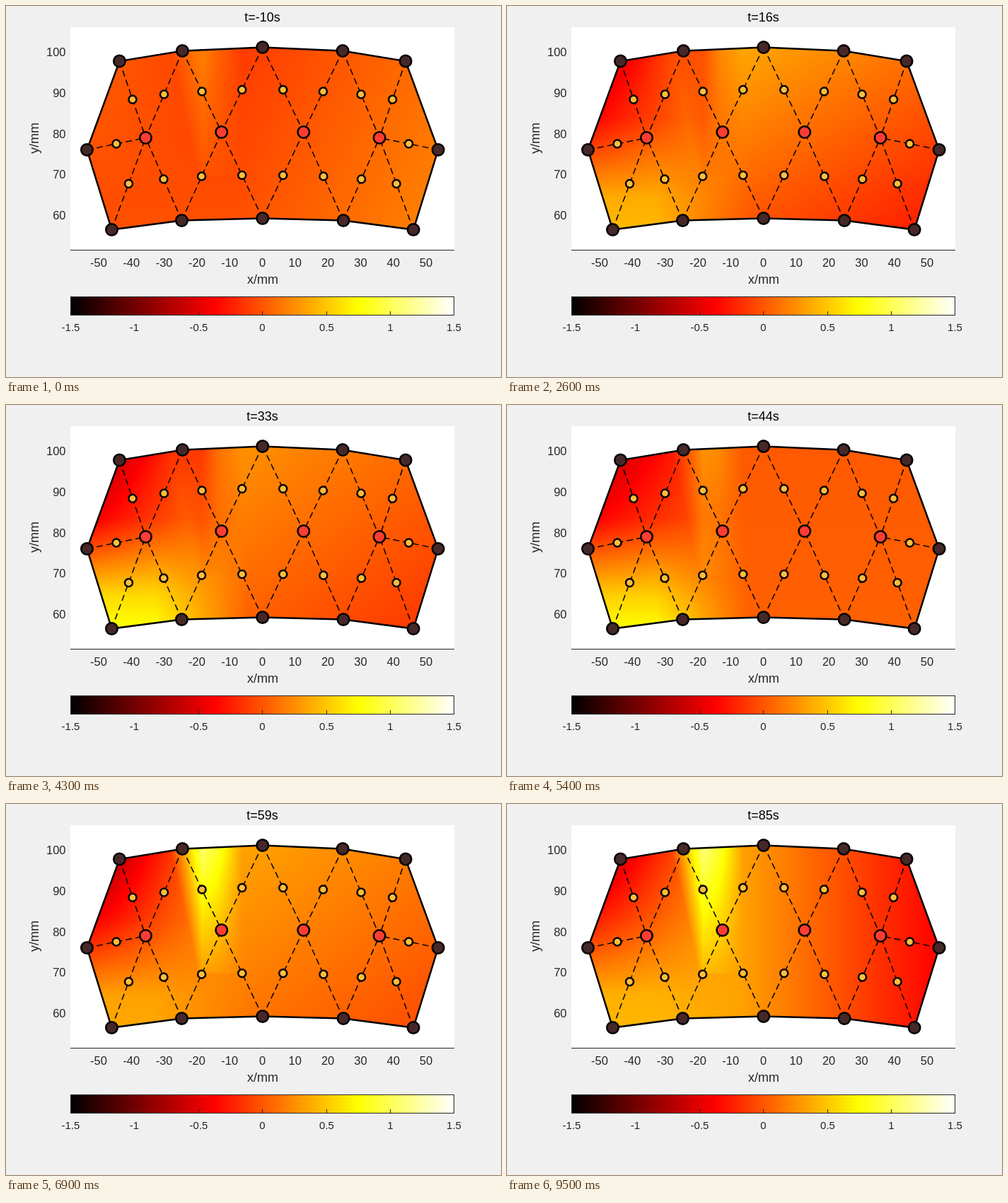
Animation, 700 px wide and 525 px high, one loop 9.6 s. Source, as an HTML page with a canvas:

```html
<!DOCTYPE html>
<html lang="en">
<head>
<meta charset="utf-8">
<title>Scalp map</title>
<style>
html, body { margin: 0; width: 100%; height: 100%; overflow: hidden; background: #f0f0f0; }
canvas { display: block; }
</style>
</head>
<body>
<canvas id="stage" width="700" height="525"></canvas>
<script>
const STEP = 100, STEPS = 96;
const INK = '#262626';
const ctx = document.getElementById('stage').getContext('2d');

// The layout is symmetric: only the left half is given, counterclockwise from the top.
const mirror = ([x, y]) => [725.6 - x, y];
const leftRim = [[362.8, 58.5], [249.5, 63.5], [160.5, 78], [114.5, 203.5],
  [149.5, 316.5], [248.5, 303.5], [362.8, 300.5]];
const leftInner = [[197.5, 186.5], [304.8, 178.5]];
const outer = [...leftRim, ...leftRim.slice(1, -1).reverse().map(mirror)];
const inner = [...leftInner, ...leftInner.map(mirror)];
const distance = (a, b) => Math.hypot(a[0] - b[0], a[1] - b[1]);
const links = inner.flatMap(i => outer.filter(o => distance(i, o) < 150).map(o => [o, i]));
const midpoints = links.map(([a, b]) => [(a[0] + b[0]) / 2, (a[1] + b[1]) / 2]);

// The field is a sum of fixed shapes, each with a strength that changes over time.
const ramp = v => Math.max(0, v);
const keySteps = [0, 16, 37, 54, 69, 82, 95];
const modes = [
  { // overall level
    shape: () => 1,
    strength: [-0.08, 0.19, 0.27, 0.03, 0.27, 0.31, 0.33]
  },
  { // slope towards the right
    shape: x => ramp((x - 333) / 267),
    strength: [0.22, -0.22, -0.28, 0, -0.18, -0.3, -0.68]
  },
  { // slope towards the bottom
    shape: (x, y) => (y - 150) / 160,
    strength: [0.06, -0.24, -0.22, 0.02, -0.13, -0.08, 0]
  },
  { // top left corner
    shape: (x, y) => ramp((300 - x) / 170) * ramp((270 - y) / 200),
    strength: [0.14, -0.8, -1.2, -0.72, -1.2, -1.3, -1.05]
  },
  { // folded ridge, ending at the lower channel row
    shape: (x, y) => {
      const height = y < 240 ? (262 - y) / 198 : 0;
      return x < 277 ? ramp(height - (277 - x) / 45) : ramp((333 - x) / 56) * height;
    },
    strength: [0.28, 0.05, -0.55, 0.35, 0.88, 0.88, 0.92]
  },
  { // bottom left glow
    shape: (x, y) => Math.min(1, ramp((340 - x) / 130)) * ramp((y - 160) / 150),
    strength: [0, 0.2, 0.7, 0.68, 0.22, 0.12, 0.1]
  }
];

const LEFT = 112, TOP = 56, W = 502, H = 262;
const heat = document.createElement('canvas');
heat.width = W;
heat.height = H;
const heatCtx = heat.getContext('2d');
const image = heatCtx.createImageData(W, H);
for (const mode of modes) {
  mode.map = Float32Array.from({ length: W * H },
    (_, i) => mode.shape(LEFT + i % W, TOP + Math.floor(i / W)));
}

function strengthsAt(step) {
  const k = Math.max(0, keySteps.findIndex(s => s >= step) - 1);
  const f = (step - keySteps[k]) / (keySteps[k + 1] - keySteps[k]);
  return modes.map(({ strength: s }) => s[k] + (s[k + 1] - s[k]) * f);
}

function renderHeat(strengths) {
  for (let i = 0, p = 0; i < W * H; i++) {
    let value = 0;
    for (let m = 0; m < modes.length; m++) value += strengths[m] * modes[m].map[i];
    const level = (value + 1.5) / 3;
    image.data[p++] = level / 0.375 * 255;
    image.data[p++] = (level / 0.375 - 1) * 255;
    image.data[p++] = (level - 0.75) * 1020;
    image.data[p++] = 255;
  }
  heatCtx.putImageData(image, 0, 0);
}

function text(str, x, y, size, color = INK, align = 'center') {
  ctx.font = size + 'px "Liberation Sans", Arial, sans-serif';
  ctx.fillStyle = color;
  ctx.textAlign = align;
  ctx.fillText(str, x, y);
}

function dot([x, y], radius, fill, width) {
  ctx.beginPath();
  ctx.arc(x, y, radius, 0, Math.PI * 2);
  ctx.fillStyle = fill;
  ctx.fill();
  ctx.lineWidth = width;
  ctx.strokeStyle = '#000';
  ctx.stroke();
}

function line(x1, y1, x2, y2) {
  ctx.beginPath();
  ctx.moveTo(x1, y1);
  ctx.lineTo(x2, y2);
  ctx.stroke();
}

function drawAxes() {
  ctx.fillStyle = '#fff';
  ctx.fillRect(91, 30, 543, 316);
  ctx.strokeStyle = INK;
  ctx.lineWidth = 1;
  line(91, 345.5, 634, 345.5);
  for (let x = -50; x <= 50; x += 10) text(x, 362.5 + x * 4.63, 369, 16.5);
  for (let y = 60; y <= 100; y += 10) text(y, 84.5, 302 - (y - 60) * 5.775, 16.5, INK, 'right');
  text('x/mm', 363, 393, 18);
  ctx.save();
  ctx.translate(46, 187);
  ctx.rotate(-Math.PI / 2);
  text('y/mm', 0, 0, 18);
  ctx.restore();
}

function drawColorbar() {
  const hot = ctx.createLinearGradient(91, 0, 634, 0);
  [[0, '#000'], [0.375, '#f00'], [0.75, '#ff0'], [1, '#fff']].forEach(s => hot.addColorStop(...s));
  ctx.fillStyle = hot;
  ctx.fillRect(91, 411, 543, 27);
  ctx.strokeStyle = INK;
  ctx.lineWidth = 1;
  ctx.strokeRect(91.5, 411.5, 542, 26);
  for (let i = 0; i <= 6; i++) {
    const x = Math.round(91 + i * 90.4) + 0.5;
    line(x, 432, x, 437);
    text(i / 2 - 1.5, x, 460, 15);
  }
}

function drawMap() {
  const outline = new Path2D();
  outer.forEach(p => outline.lineTo(...p));
  outline.closePath();
  ctx.save();
  ctx.clip(outline);
  ctx.drawImage(heat, LEFT, TOP);
  ctx.restore();
  ctx.strokeStyle = '#000';
  ctx.lineWidth = 2.5;
  ctx.stroke(outline);

  ctx.lineWidth = 1.5;
  ctx.setLineDash([9, 5]);
  links.forEach(([a, b]) => line(...a, ...b));
  ctx.setLineDash([]);
  outer.forEach(p => dot(p, 8.2, '#462828', 2.6));
  inner.forEach(p => dot(p, 8.2, '#ff3c32', 2.6));
  midpoints.forEach(p => dot(p, 5.5, '#ffbe3c', 2.5));
}

function draw(step) {
  ctx.fillStyle = '#f0f0f0';
  ctx.fillRect(0, 0, 700, 525);
  drawAxes();
  drawColorbar();
  renderHeat(strengthsAt(step));
  drawMap();
  text('t=' + (step - 10) + 's', 362.5, 22, 18, '#000');
}

const start = performance.now();
let shown = -1;
function tick() {
  const step = Math.floor((performance.now() - start) / STEP) % STEPS;
  if (step !== shown) draw(shown = step);
  requestAnimationFrame(tick);
}
tick();
</script>
</body>
</html>
```
